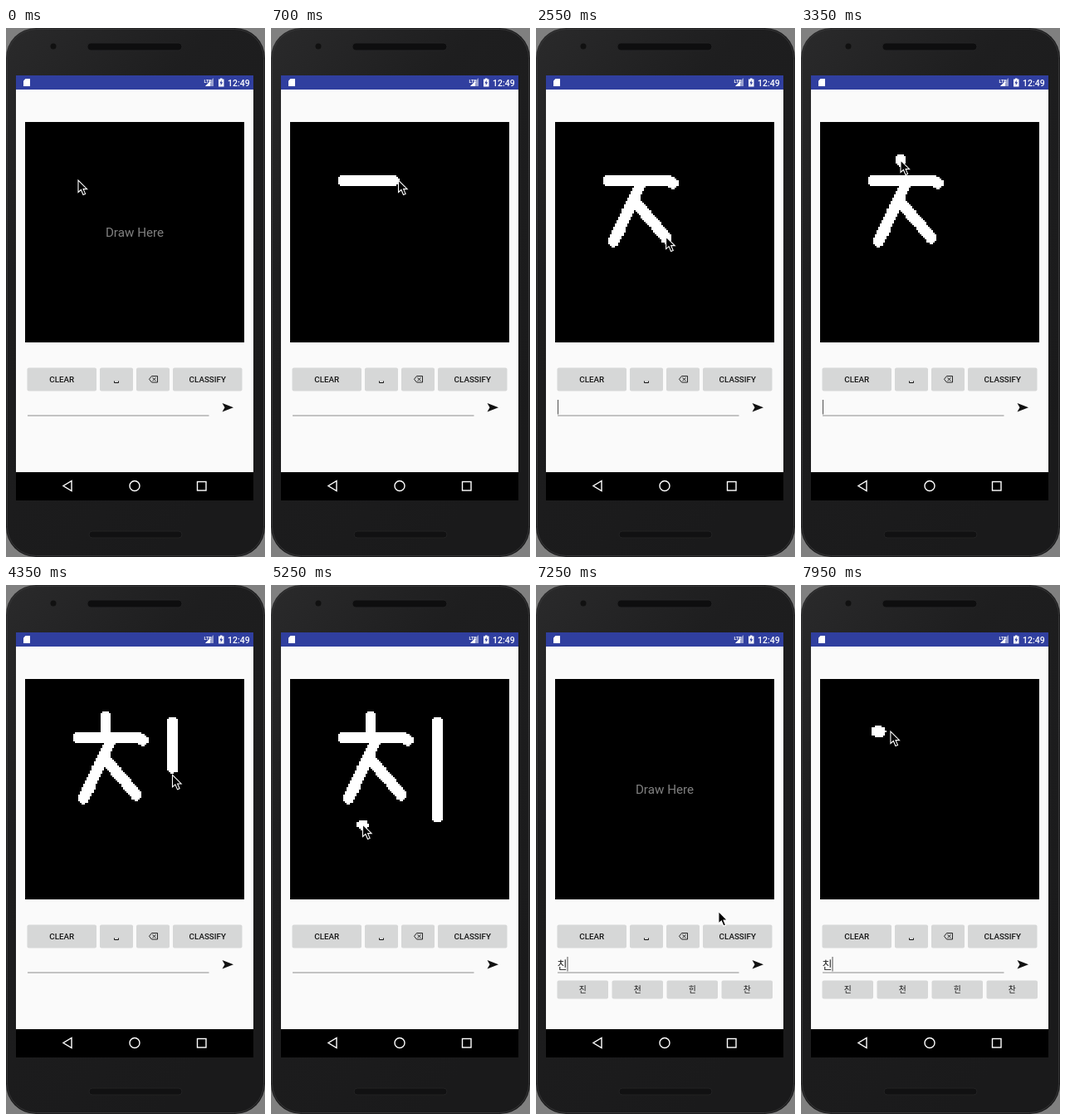
Write an HTML page with a canvas that moves like this. It is 312 by 636 pixels and loops after 8000 ms.

```html
<!DOCTYPE html>
<html lang="en">
<head>
<meta charset="utf-8">
<title>Handwriting input</title>
<style>
  html, body { margin: 0; width: 100%; height: 100%; overflow: hidden; background: #808080; }
  svg, canvas { position: absolute; left: 0; top: 0; display: block; }
  canvas { left: 23px; top: 113px; width: 264px; height: 265px; image-rendering: pixelated; background: #000; }
  text { font-family: Roboto, "Noto Sans CJK KR", "Noto Sans CJK", sans-serif; }
  .btn { fill: #d6d7d7; }
  .label { font-size: 9.8px; font-weight: 500; text-anchor: middle; fill: #141414; }
  .nav { fill: none; stroke: #fff; stroke-width: 1.4; }
</style>
</head>
<body>
<svg width="312" height="636" viewBox="0 0 312 636">
  <defs>
    <linearGradient id="body" x2=".6" y2="1">
      <stop offset="0" stop-color="#2a2a2b"/>
      <stop offset=".35" stop-color="#1e1e1f"/>
      <stop offset="1" stop-color="#1a1a1b"/>
    </linearGradient>
  </defs>
  <rect width="312" height="636" rx="36" fill="url(#body)"/>
  <rect x="1.5" y="1.5" width="309" height="633" rx="35" fill="none" stroke="#353536"/>
  <circle cx="57" cy="22" r="3.5" fill="#111"/>
  <rect x="98" y="18" width="114" height="9" rx="4.5" fill="#0e0e0f" stroke="#252526"/>
  <rect x="100" y="605" width="112" height="8" rx="4" fill="#111112" stroke="#222223"/>

  <rect x="12" y="57" width="286" height="511" fill="#fafafa"/>
  <rect x="12" y="57" width="286" height="17" fill="#303f9f"/>
  <path d="M23.5 61H29V70H21V63.5Z" fill="#fff"/>
  <path d="M250 60V70H240Z" fill="#98a0cf"/>
  <path d="M246 64V70H240Z" fill="#fff"/>
  <text x="238.5" y="65.5" font-size="5.5" font-weight="700" fill="#fff">LTE</text>
  <path d="M256 61.5H258V60.5H260.5V61.5H262.5V70.5H256Z" fill="#fff"/>
  <path d="M259.8 62.5L257.3 66.5H259L258.6 69.3L261.2 65.2H259.5Z" fill="#303f9f"/>
  <text x="267" y="69.5" font-size="10.5" font-weight="500" fill="#fff">12:49</text>

  <g id="keys"></g>
  <path d="M130.5 424.5V426.5H135.5V424.5" fill="none" stroke="#141414"/>
  <path d="M175.5 418.5H182.5V426H175.5L172.5 422.25ZM176.5 420.2L180.5 424.3M180.5 420.2L176.5 424.3" fill="none" stroke="#141414" stroke-width=".9"/>
  <path d="M26 466H244.5" stroke="#8c8c8c"/>
  <path d="M260.5 451L274 456.2L260.5 461.5L263.5 456.2Z" fill="#111"/>
  <g id="result">
    <text x="25.5" y="460.5" font-size="13" fill="#212121">친</text>
  </g>
  <path id="caret" d="M0 447V464.5" stroke="#505050"/>

  <rect x="12" y="534" width="286" height="34" fill="#000"/>
  <path class="nav" d="M79 544.5V556.5L69 550.5Z"/>
  <circle class="nav" cx="155" cy="550.5" r="6"/>
  <rect class="nav" x="230.5" y="545.5" width="10.5" height="10.5"/>
</svg>
<canvas id="pad" width="128" height="128"></canvas>
<svg width="312" height="636" viewBox="0 0 312 636">
  <text id="hint" x="155" y="251" font-size="15.2" text-anchor="middle" fill="#808080">Draw Here</text>
  <path id="mouse" d="M0 0V14.5L3.4 11.5L6 17.5L8.6 16.4L6.1 10.6H10.6Z" fill="#000" stroke="#fff" stroke-width="1.1"/>
</svg>
<script>
const $ = id => document.getElementById(id);
const LOOP = 8000, STEP = 50, CLEAR = 7000, BLINK = 750;
const GRID = 128, CELL = 264 / GRID, RADIUS = 6.7;

const mix = (a, b, u) => a + (b - a) * u;
const clamp = u => Math.min(1, Math.max(0, u));
const ease = u => u * u * (3 - 2 * u);
const show = (id, on) => $(id).style.display = on ? "" : "none";

// A gesture runs along its points at constant speed.
const gesture = (from, to, path) => ({ from, to, pts: path.split(" ").map(p => p.split(",").map(Number)) });
const gestures = [
  gesture(150, 800, "87,183 158,183 165,186"),
  gesture(1050, 1400, "125,189 93.5,256"),
  gesture(1950, 2500, "121,210 157,252"),
  gesture(3350, 3620, "120,159 120,181"),
  gesture(4000, 4620, "200.5,164 200.5,278"),
  gesture(5250, 6150, "110.5,288 110.5,341 130,339 156,333 217,335"),
  gesture(6650, 7050, "242,429.5"),
  gesture(7880, 8000, "91,176 120,176")
];

// The part of a path covered after the share u of its length.
function trace(pts, u) {
  const legs = pts.slice(1).map((p, i) => Math.hypot(p[0] - pts[i][0], p[1] - pts[i][1]));
  let left = u * legs.reduce((a, b) => a + b, 0);
  const out = [pts[0]];
  legs.forEach((len, i) => {
    if (left <= 0) return;
    const v = Math.min(1, left / len);
    out.push([0, 1].map(c => mix(pts[i][c], pts[i + 1][c], v)));
    left -= len;
  });
  return out;
}

function mouseAt(t) {
  const next = gestures.findIndex(g => t < g.to), g = gestures[next];
  if (t >= g.from) return trace(g.pts, (t - g.from) / (g.to - g.from)).pop();
  if (!next) return g.pts[0];
  const prev = gestures[next - 1], end = prev.pts[prev.pts.length - 1];
  const u = ease((t - prev.to) / (g.from - prev.to));
  return [0, 1].map(c => mix(end[c], g.pts[0][c], u));
}

const ctx = $("pad").getContext("2d");
ctx.fillStyle = "#fff";

// Fills every grid cell within the pen radius of a segment.
function ink([x1, y1], [x2, y2]) {
  const dx = x2 - x1, dy = y2 - y1, len2 = dx * dx + dy * dy || 1;
  const lo = (a, b, o) => Math.floor((Math.min(a, b) - o - RADIUS) / CELL);
  const hi = (a, b, o) => Math.ceil((Math.max(a, b) - o + RADIUS) / CELL);
  for (let j = lo(y1, y2, 113); j <= hi(y1, y2, 113); j++) {
    for (let i = lo(x1, x2, 23); i <= hi(x1, x2, 23); i++) {
      const px = 23 + (i + .5) * CELL - x1, py = 113 + (j + .5) * CELL - y1;
      const u = clamp((px * dx + py * dy) / len2);
      if (Math.hypot(px - dx * u, py - dy * u) < RADIUS) ctx.fillRect(i, j, 1, 1);
    }
  }
}

function addKey(parent, x, y, w, h, label) {
  $(parent).insertAdjacentHTML("beforeend",
    `<rect class="btn" x="${x}" y="${y}" width="${w}" height="${h}" rx="2"/>` +
    `<text class="label" x="${x + w / 2}" y="${y + h / 2 + 3.5}">${label}</text>`);
}
let keyX = 25.5;
for (const label of ["CLEAR", "", "", "CLASSIFY"]) {
  const w = label ? 83.5 : 40;
  addKey("keys", keyX, 408.5, w, 28, label);
  keyX += w + 4;
}
["진", "천", "힌", "찬"].forEach((s, i) => addKey("result", 25.5 + i * 66, 475.5, 61.5, 22, s));

function draw(t) {
  const done = t >= CLEAR;
  const strokes = gestures.filter(g => g.pts.length > 1 && g.from <= t && (g.from >= CLEAR) === done);
  ctx.clearRect(0, 0, GRID, GRID);
  for (const g of strokes) {
    // Ink trails the pointer by one step.
    const line = trace(g.pts, clamp((t - STEP - g.from) / (g.to - g.from)));
    line.forEach((p, i) => ink(line[Math.max(0, i - 1)], p));
  }
  $("mouse").setAttribute("transform", `translate(${mouseAt(t)})`);
  $("caret").setAttribute("transform", `translate(${done ? 38 : 26.5})`);
  show("caret", Math.abs(t % BLINK - BLINK / 2) < BLINK / 4);
  show("hint", !strokes.length);
  show("result", done);
}

const start = performance.now();
function tick() {
  const t = (performance.now() - start) % LOOP;
  draw(Math.floor(t / STEP) * STEP);
  requestAnimationFrame(tick);
}
tick();
</script>
</body>
</html>
```
